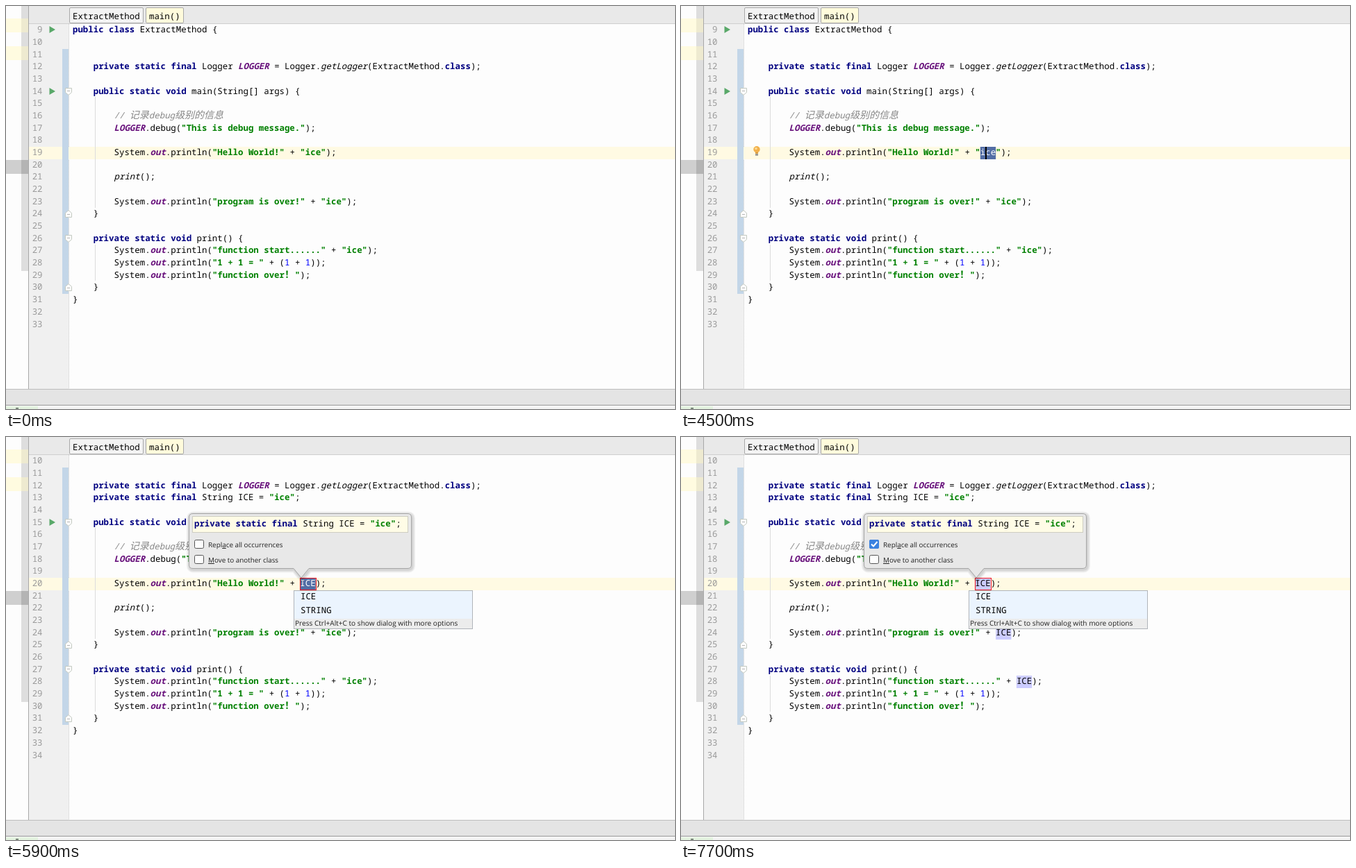
Animation, 963 px wide and 581 px high, one loop 8000 ms. Source, as an HTML page:

```html
<!DOCTYPE html>
<html lang="zh-CN">
<head>
<meta charset="utf-8">
<title>Extract constant</title>
<style>
html, body { margin: 0; width: 100%; height: 100%; overflow: hidden; background: #fdfdfd; }
svg { display: block; }
text { white-space: pre; text-rendering: geometricPrecision; font: 12.4px "Noto Sans Mono", monospace; }
.kw { font-weight: 700; fill: #000080; }
.str { font-weight: 700; fill: #008000; }
.field { font-weight: 700; font-style: italic; fill: #660e7a; }
.call { font-style: italic; }
.num { fill: #0000ff; }
.note { font-style: italic; fill: #868686; }
.line { fill: #9a9a9a; }
.white { fill: #fff; }
.cjk { font-family: "Noto Sans CJK SC", sans-serif; font-size: 14px; }
.ui { font-family: "Open Sans", sans-serif; font-size: 9.9px; fill: #222; }
.hint { font-size: 10.1px; }
</style>
</head>
<body>
<svg id="stage" xmlns="http://www.w3.org/2000/svg" width="963" height="581" viewBox="0 0 963 581"></svg>
<script>
const NS = "http://www.w3.org/2000/svg";
const stage = document.getElementById("stage");
const CHAR = 7.44, LEFT = 96, PITCH = 17.68, LOOP = 8000;
const colX = c => LEFT + c * CHAR;
const baseY = row => Math.round(38.2 + row * PITCH);

function el(parent, tag, attrs = {}) {
  const node = document.createElementNS(NS, tag);
  for (const k in attrs) node.setAttribute(k, attrs[k]);
  parent.appendChild(node);
  return node;
}
const group = (parent = stage) => el(parent, "g");
const rect = (p, x, y, width, height, fill, more) => el(p, "rect", { x, y, width, height, fill, ...more });
const path = (p, d, fill, more) => el(p, "path", { d, fill, ...more });
function text(p, x, y, str, cls = "") {
  const node = el(p, "text", { x, y, class: cls });
  node.textContent = str;
  return node;
}

function styleOf(word, rest) {
  if (word[0] === '"') return "str";
  if (/^(public|private|static|final|class|void)$/.test(word)) return "kw";
  if (/^(LOGGER|out)$/.test(word)) return "field";
  if (word === "getLogger" || (word === "print" && rest.startsWith("();"))) return "call";
  return /^\d+$/.test(word) ? "num" : "";
}
function code(p, x, y, src) {
  for (const m of src.matchAll(/"[^"]*"|\w+|[^\w\s"]+/g)) {
    const end = m.index + m[0].length;
    text(p, x + m.index * CHAR, y, m[0], styleOf(m[0], src.slice(end)));
  }
}

function panels() {
  const g = group();
  rect(g, 22, 0, 10, 382, "#dedede");
  for (const y of [18, 58]) {
    rect(g, 0, y, 22, 20, "#fffbe0");
    rect(g, 22, y, 10, 20, "#eeead0");
  }
  rect(g, 0, 222, 22, 20, "#cfcfcf");
  rect(g, 22, 222, 10, 20, "#b4b4b4");
  rect(g, 33, 26, 57, 526, "#f0f0f0");
  rect(g, 33, 0, 930, 25, "#e9e9e9");
  rect(g, 33, 25, 930, 1, "#cfcfcf");
  rect(g, 32, 0, 1, 552, "#a8a8a8");
  path(g, "M90.5 26V552", "none", { stroke: "#c4c4c4", "stroke-dasharray": "1 1" });
  rect(g, 33, 203, 930, 18, "#fffae3");
  rect(g, 0, 552, 963, 1, "#bdbdbd");
  rect(g, 0, 553, 963, 22, "#e4e4e4");
  rect(g, 0, 575, 963, 1, "#9b9b9b");
  rect(g, 0, 576, 963, 5, "#f4f4f4");
  rect(g, 0, 577, 46, 4, "#e4f3e0");
  rect(g, 14, 579, 4, 2, "#7d8a7d");
  const tab = { rx: 1.5, stroke: "#a9a9a9" };
  rect(g, 91.5, 2.5, 106, 22, "#f3f3f3", tab);
  rect(g, 201.5, 2.5, 54, 22, "#fffbdc", tab);
  text(g, 96, 19, "ExtractMethod");
  text(g, 206, 19, "main()");
}

function gutter(p, first, barTop, arrows) {
  rect(p, 81, barTop, 9, 415 - barTop, "#c3d6e8");
  for (let i = 0; i < 25; i++)
    text(p, 52.5, baseY(i), first + i, "line").setAttribute("text-anchor", "end");
  for (const row of arrows) {
    const y = baseY(row) - 4;
    path(p, `M62.5 ${y - 5}L71 ${y}L62.5 ${y + 5}Z`, "#59a869");
  }
  for (const [row, dir] of [[5, 1], [15, -1], [17, 1], [21, -1]]) {
    const y = baseY(row) - 3.5;
    path(p, `M85.5 ${y - 5 * dir}H94.5V${y + dir}L90 ${y + 5 * dir}L85.5 ${y + dir}Z`, "#fdfdfd", { stroke: "#c2c8c0" });
    path(p, `M88 ${y - dir}H92`, "none", { stroke: "#b5b5b5" });
  }
}

const logger = "    private static final Logger LOGGER = Logger.getLogger(ExtractMethod.class);";
const println = arg => `        System.out.println(${arg});`;

function listing(p, head, word, others) {
  const rows = {
    ...head,
    5: "    public static void main(String[] args) {",
    8: '        LOGGER.debug("This is debug message.");',
    10: println('"Hello World!" + ' + word),
    12: "        print();",
    14: println('"program is over!" + ' + others),
    15: "    }",
    17: "    private static void print() {",
    18: println('"function start......" + ' + others),
    19: println('"1 + 1 = " + (1 + 1)'),
    20: println('"function over  "'),
    21: "    }",
    22: "}"
  };
  path(p, "M128.5 131V291M128.5 344V396", "none", { stroke: "#dcdcdc" });
  for (const r in rows) code(p, LEFT, baseY(+r), rows[r]);
  text(p, colX(41), baseY(20), "！", "str cjk");
  const y = baseY(7);
  text(p, colX(8), y, "//", "note");
  text(p, colX(11), y, "记录", "note cjk");
  text(p, colX(11) + 28, y, "debug", "note");
  text(p, colX(16) + 28, y, "级别的信息", "note cjk");
}

function mark(p, row, col, fill) {
  rect(p, colX(col), baseY(row) - 12, 3 * CHAR, 18, fill);
}
function selected(p, col, word) {
  mark(p, 10, col, "#526da5");
  text(p, colX(col), baseY(10), word, "white");
}
function frameBox(p) {
  rect(p, 423.5, 203.5, 23, 17, "none", { stroke: "#f01820" });
}

function makeBulb() {
  const g = group();
  el(g, "circle", { cx: 109, cy: 206.8, r: 4.7, fill: "#f2b04a" });
  el(g, "circle", { cx: 108, cy: 205.5, r: 1.8, fill: "#fbd995" });
  rect(g, 107, 211, 4, 2, "#d29a45");
  rect(g, 107, 213.5, 4, 2, "#7d7d7d");
  return g;
}

function makeMenu() {
  const g = group();
  rect(g, 414.5, 221.5, 257, 55, "#ebf4fe", { stroke: "#b0b4ba" });
  rect(g, 415, 262, 256, 14, "#ececec");
  text(g, 424, 234, "ICE");
  text(g, 424, 254, "STRING");
  text(g, 416, 272, "Press Ctrl+Alt+C to show dialog with more options", "ui hint");
  return g;
}

function makeBalloon() {
  const g = group();
  const shape = "M269 110.5H578Q583.5 110.5 583.5 116V184Q583.5 189.5 578 189.5H436L425 203L414 189.5H269Q263.5 189.5 263.5 184V116Q263.5 110.5 269 110.5Z";
  for (const w of [9, 6, 3])
    path(g, shape, "none", { stroke: "#000", "stroke-opacity": .06, "stroke-width": w, transform: "translate(1 1.5)" });
  path(g, shape, "#e8e8e8", { stroke: "#a6a6a6" });
  rect(g, 268.5, 114.5, 310, 23, "#fffce6", { stroke: "#a8a89a", "stroke-dasharray": "1 1" });
  code(g, 271, 129, 'private static final String ICE = "ice";');
  for (const y of [148.5, 170.5]) rect(g, 271.5, y, 13, 12, "#fdfdfd", { rx: 2, stroke: "#555" });
  const labels = [["Repl", "a", "ce all occurrences", 159], ["", "M", "ove to another class", 181]];
  for (const [before, key, after, y] of labels) {
    const label = text(g, 291, y, "", "ui");
    el(label, "tspan").textContent = before;
    el(label, "tspan", { "text-decoration": "underline" }).textContent = key;
    el(label, "tspan").textContent = after;
  }
  return g;
}

function makeTick() {
  const g = group();
  rect(g, 271, 148, 14, 13, "#3b82e0", { rx: 2 });
  path(g, "M274 154.5L277 157.5L282.5 151", "none", { stroke: "#fff", "stroke-width": 2 });
  return g;
}

function makeClose() {
  const g = group();
  el(g, "circle", { cx: 577, cy: 89.5, r: 10.3, fill: "#000", "fill-opacity": .22 });
  el(g, "circle", { cx: 577, cy: 89, r: 9, fill: "#2f2f2f", stroke: "#fafafa", "stroke-width": 1.2 });
  path(g, "M573.5 85.5L580.5 92.5M580.5 85.5L573.5 92.5", "none", { stroke: "#fff", "stroke-width": 2.2 });
  return g;
}

panels();

const before = group();
gutter(before, 9, 62, [0, 5]);
listing(before, { 0: "public class ExtractMethod {", 3: logger }, '"ice"', '"ice"');
const picked = group();
selected(picked, 45, "ice");

const constant = { 2: logger, 3: '    private static final String ICE = "ice";' };
const extracted = group();
gutter(extracted, 10, 44, [5]);
listing(extracted, constant, "ICE", '"ice"');
selected(extracted, 44, "ICE");
frameBox(extracted);

const replaced = group();
gutter(replaced, 10, 44, [5]);
for (const [row, col] of [[10, 44], [14, 48], [18, 52]]) mark(replaced, row, col, "#ccccff");
listing(replaced, constant, "ICE", "ICE");
frameBox(replaced);

const bulb = makeBulb(), menu = makeMenu(), balloon = makeBalloon(), tick = makeTick(), close = makeClose();
const caret = rect(stage, 438, 203, 2, 18, "#000");

const show = (node, on) => node.setAttribute("display", on ? "inline" : "none");
const toggled = (t, times) => times.filter(at => at <= t).length % 2 === 1;
const within = (t, from, to) => t >= from && t < to;

function draw(t) {
  const done = t >= 5100, swap = t >= 7100;
  show(before, !done);
  show(picked, within(t, 2100, 5100));
  show(bulb, !done && toggled(t, [1800, 2100, 2800]));
  show(extracted, done && !swap);
  show(replaced, swap);
  show(menu, done && !within(t, 7000, 7100));
  show(balloon, done);
  const fade = Math.floor((t - 5100) / 100);
  balloon.setAttribute("opacity", Math.min(1, .34 + .33 * Math.max(0, fade)));
  show(tick, swap);
  show(close, within(t, 6400, 7700));
  show(caret, done
    ? toggled(t, [5100, 5900, 6400, 6800, 7100, 7700])
    : toggled(t, [800, 1700, 2100, 3100, 3600, 4100, 4500]));
  caret.setAttribute("x", done ? 445 : 438);
}

const start = performance.now();
function tickFrame() {
  draw((performance.now() - start) % LOOP);
  requestAnimationFrame(tickFrame);
}
draw(0);
requestAnimationFrame(tickFrame);
</script>
</body>
</html>
```
